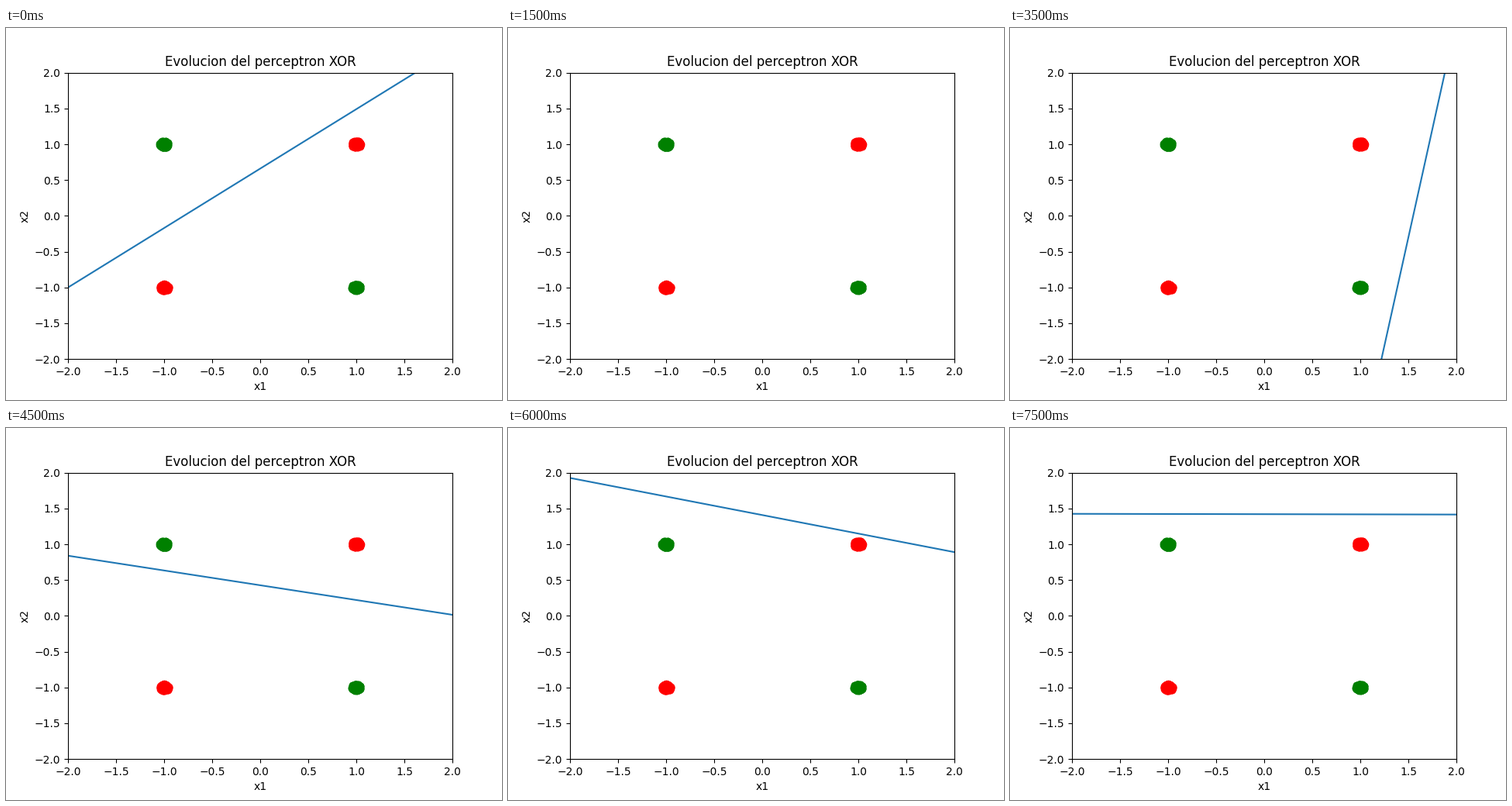
Recreate the animation shown at these times as a matplotlib script. Size 640 by 480 pixels, loop 8 s.

```python
import numpy as np
import matplotlib.pyplot as plt
from matplotlib.animation import FuncAnimation

LIM = 2.0
EPOCHS = 16
STEP_MS = 500
PIVOT = 1.084

rng = np.random.default_rng(7)


def cluster(x, y, n=120, radius=0.049):
    """Points spread evenly over a small disc."""
    r = radius * np.sqrt(rng.random(n))
    a = 2 * np.pi * rng.random(n)
    return x + r * np.cos(a), y + r * np.sin(a)


def pivoted(left):
    """Boundary from the left edge to the pivot on the opposite border."""
    slope = (-np.sign(left) * LIM - left) / (PIVOT + LIM)
    return left, left + 2 * LIM * slope


def through(xa, xb):
    """Boundary crossing the bottom at xa and the top at xb."""
    slope = 2 * LIM / (xb - xa)
    return -LIM - slope * (LIM + xa), -LIM + slope * (LIM - xa)


# Heights at the left and right edge; missing epochs leave the view
boundaries = {
    0: (-1.0, 2.32),
    1: through(-0.63, 2.04),
    7: through(1.22, 1.88),
    9: (0.84, 0.015),
    10: through(1.457, -1.75),
    11: through(0.532, -1.964),
    12: (1.926, 0.89),
    14: (-1.1, 1.1),
    15: (1.425, 1.415),
}
for epoch, left in {2: 1.42, 4: -1.1, 6: 2.58, 8: 1.09, 13: 1.64}.items():
    boundaries[epoch] = pivoted(left)

fig, ax = plt.subplots(figsize=(6.4, 4.8), dpi=100)
ax.set(xlim=(-LIM, LIM), ylim=(-LIM, LIM), xlabel="x1", ylabel="x2",
       title="Evolucion del perceptron XOR")

for sx in (-1, 1):
    for sy in (-1, 1):
        ax.scatter(*cluster(sx, sy), c="red" if sx == sy else "green")

line, = ax.plot([], [], color="tab:blue", lw=1.5)


def update(epoch):
    heights = boundaries.get(epoch, (np.nan, np.nan))
    line.set_data([-LIM, LIM], heights)
    return line,


anim = FuncAnimation(fig, update, frames=EPOCHS, interval=STEP_MS,
                     repeat=True, repeat_delay=0)
plt.show()
```
